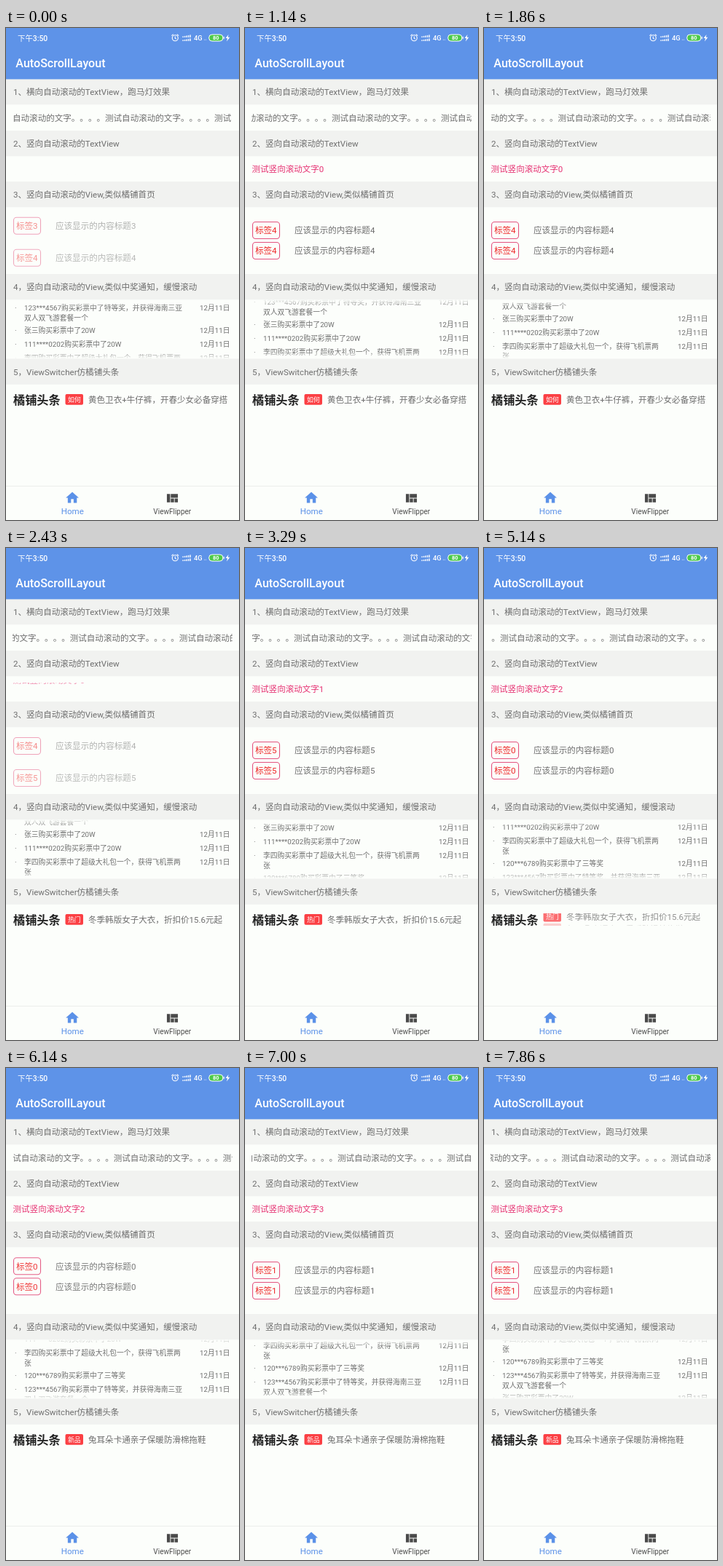
An HTML page that plays this animation: 320 by 676 pixels, repeating every 8 s.

```html
<!DOCTYPE html>
<html lang="zh-CN">
<head>
<meta charset="utf-8">
<title>AutoScrollLayout</title>
<style>
  html, body { margin: 0; height: 100%; overflow: hidden; background: #fcfefb; }
  body > svg { display: block; width: 100%; height: 100%; }
  text {
    font: 11.56px Roboto, "Noto Sans CJK SC", "Noto Sans CJK", sans-serif;
    fill: #6e6e6e;
    text-spacing-trim: space-all;
    white-space: pre;
  }
  .small { font-size: 9.78px; }
  .accent { fill: #e63272; }
  .label { fill: #ee2626; }
  .badge { font-size: 8.9px; fill: #fff; text-anchor: middle; }
  .headline { font-size: 16.2px; font-weight: 700; fill: #222; }
  .bar { font-size: 16.1px; font-weight: 500; fill: #fff; }
  .clock { font-size: 10.4px; font-weight: 500; fill: #fff; }
  .net { font-size: 9.4px; font-weight: 500; fill: #fff; }
  .level { font-size: 7.5px; font-weight: 700; fill: #fff; text-anchor: middle; }
  .home { fill: #5b91e8; text-anchor: middle; }
  .tab { font-size: 10px; fill: #4c4c4c; text-anchor: middle; }
</style>
</head>
<body>
<svg id="stage" viewBox="0 0 320 676"></svg>
<script>
const LOOP = 8000, FPS = 7;
const NOTICE = { start: 2090, period: 2000, duration: 700 };
const TAGS = { start: 1970, period: 2000, duration: 950 };
const NEWS = { start: 2010, period: 3000, duration: 400 };
const LIST_PERIOD = 119;

// y is the middle of the characters
const text = (x, y, content, cls = "") =>
  `<text x="${x}" y="${y}" dy=".38em" class="${cls}">${content}</text>`;
const rect = (x, y, w, h, attrs) =>
  `<rect x="${x}" y="${y}" width="${w}" height="${h}" ${attrs}/>`;
const windowBox = (id, y, h, content = "") =>
  `<svg id="${id}" x="9" y="${y}" width="302" height="${h}" viewBox="9 ${y} 302 ${h}">${content}</svg>`;
const flipper = (id, y, h) => windowBox(id, y, h, "<g></g><g></g>");

const titles = [
  [70, "1、横向自动滚动的TextView，跑马灯效果"],
  [141, "2、竖向自动滚动的TextView"],
  [211, "3、竖向自动滚动的View,类似橘铺首页"],
  [338, "4，竖向自动滚动的View,类似中奖通知，缓慢滚动"],
  [454.5, "5，ViewSwitcher仿橘铺头条"],
];
const winners = [
  ["123***4567购买彩票中了特等奖，并获得海南三亚", "双人双飞游套餐一个"],
  ["张三购买彩票中了20W"],
  ["111****0202购买彩票中了20W"],
  ["李四购买彩票中了超级大礼包一个，获得飞机票两", "张"],
  ["120***6789购买彩票中了三等奖"],
];
const news = [
  ["如何", "黄色卫衣+牛仔裤，开春少女必备穿搭"],
  ["热门", "冬季韩版女子大衣，折扣价15.6元起"],
  ["新品", "兔耳朵卡通亲子保暖防滑棉拖鞋"],
];

function winnerList(top) {
  let y = top, out = "";
  for (const lines of winners) {
    out += text(12, y, "·", "small") + text(266, y, "12月11日", "small");
    lines.forEach((line, i) => out += text(25, y + 14 * i, line, "small"));
    y += lines.length > 1 ? 31 : 19;
  }
  return out;
}

const notice = i => i < 0 ? "" : text(9.5, 194, "测试竖向滚动文字" + i, "accent");
const tagPage = i => [278, 306].map(y =>
  rect(10.5, y - 11.5, 37, 23, 'rx="4" fill="none" stroke="#e4527f" stroke-width="1.1"') +
  text(14, y, "标签" + i, "label") +
  text(68, y, "应该显示的内容标题" + i)).join("");
const newsPage = i =>
  rect(81.5, 503, 24.5, 14.7, 'rx="2" fill="#fb4044"') +
  text(93.8, 510.5, news[i][0], "badge") +
  text(113, 511, news[i][1]);

function statusIcons() {
  let bars = "";
  for (let i = 0; i < 5; i++)
    for (const bottom of [13, 18])
      bars += rect(242.3 + i * 2.5, bottom - 1.6 - i * 0.5, 1.6, 1.6 + i * 0.5, 'fill="#fff" opacity=".85"');
  return `<g fill="none" stroke="#fff" stroke-width="1.1">
      <circle cx="232.3" cy="13.8" r="4"/>
      <path d="M232.3 11.5v2.6l1.6 1M227.4 10.6l2.4-2M237.2 10.6l-2.4-2"/></g>` +
    bars + text(258, 13.5, "4G", "net") +
    rect(272, 15.5, 0.8, 1.5, 'fill="#fff" opacity=".6"') +
    rect(274, 15.5, 0.8, 1.5, 'fill="#fff" opacity=".6"') +
    rect(278.8, 9, 19, 9, 'rx="4" fill="#4cc94a" stroke="#fff"') +
    rect(298.6, 11.8, 1.2, 3.4, 'fill="#fff"') +
    text(288.3, 13.4, "80", "level") +
    '<path d="M305.6 9l-4 5h2.6l-1.2 4.4 4.4-5.6h-2.7z" fill="#fff"/>';
}

const stage = document.getElementById("stage");
stage.innerHTML = `
  <defs>
    <linearGradient id="fade" x2="0" y2="1">
      <stop stop-color="#000"/><stop offset=".12" stop-color="#fff"/>
      <stop offset=".88" stop-color="#fff"/><stop offset="1" stop-color="#000"/>
    </linearGradient>
    <mask id="edges" maskUnits="userSpaceOnUse" x="0" y="373" width="320" height="81.5">
      ${rect(0, 373, 320, 81.5, 'fill="url(#fade)"')}
    </mask>
  </defs>
  ${rect(0, 0, 320, 676, 'fill="#fcfefb"')}
  ${titles.map(([y, s]) => rect(0, y, 320, 35.3, 'fill="#f1f2f0"') + text(10, y + 17.8, s)).join("")}
  ${rect(0, 0, 320, 70.4, 'fill="#5e93e8"')}
  ${text(16, 13.7, "下午3:50", "clock")}${statusIcons()}
  ${text(13.3, 47.7, "AutoScrollLayout", "bar")}
  ${windowBox("marquee", 106, 35, text(9, 123.5, "自动滚动的文字。。。。测试".repeat(5)))}
  ${flipper("notices", 185, 17)}
  ${flipper("tags", 256, 73)}
  <g mask="url(#edges)"><g id="winners">${winnerList(384) + winnerList(384 + LIST_PERIOD)}</g></g>
  ${text(10, 511, "橘铺头条", "headline")}
  ${flipper("news", 502, 17)}
  ${rect(0, 629, 320, 1, 'fill="#eceeeb"')}
  <path transform="translate(80.4 634.8) scale(.889)" fill="#5b91e8"
    d="M10 20v-6h4v6h5v-8h3L12 3 2 12h3v8z"/>
  <path transform="translate(217.4 635.8) scale(.889)" fill="#4a4a4a"
    d="M10 18h5v-6h-5zM4 18h5V5H4zM16 18h5v-6h-5zM10 5v6h11V5z"/>
  ${text(91.3, 663.7, "Home", "home")}
  ${text(228.3, 664, "ViewFlipper", "tab")}`;

const byId = id => document.getElementById(id);
const marqueeText = byId("marquee").firstElementChild;

// Turn number and eased progress of a periodic page change
function turn(t, { start, period, duration }) {
  const index = Math.floor((t - start) / period) + 1;
  const x = Math.min(1, (t - start - (index - 1) * period) / duration);
  return [index, (1 - Math.cos(Math.PI * x)) / 2];
}

function showFlip(id, height, timing, t, pageAt) {
  const [n, p] = turn(t, timing);
  [[n - 1, -p, 1 - p], [n, 1 - p, p]].forEach(([index, shift, opacity], i) => {
    const group = byId(id).children[i];
    group.innerHTML = pageAt(index);
    group.setAttribute("transform", `translate(0 ${shift * height})`);
    group.setAttribute("opacity", opacity);
  });
}

function draw(time) {
  const step = Math.floor((time + 5) * FPS / 1000);
  // The screen rests on its opening pose for the first four steps
  const t = step < 4 ? 430 : step * 1000 / FPS;

  marqueeText.setAttribute("x", 9 - Math.max(0, t - 437) * 0.02425);
  byId("winners").setAttribute("transform", `translate(0 ${-Math.max(0, t - 460) * 0.0109})`);

  showFlip("notices", 25.5, NOTICE, t, notice);
  showFlip("tags", 72, TAGS, t, n => tagPage((n + 4) % 6));
  showFlip("news", 17, NEWS, t, n => newsPage((n + 3) % 3));
}

function frame(now) {
  draw(now % LOOP);
  requestAnimationFrame(frame);
}
draw(0);
requestAnimationFrame(frame);
</script>
</body>
</html>
```
